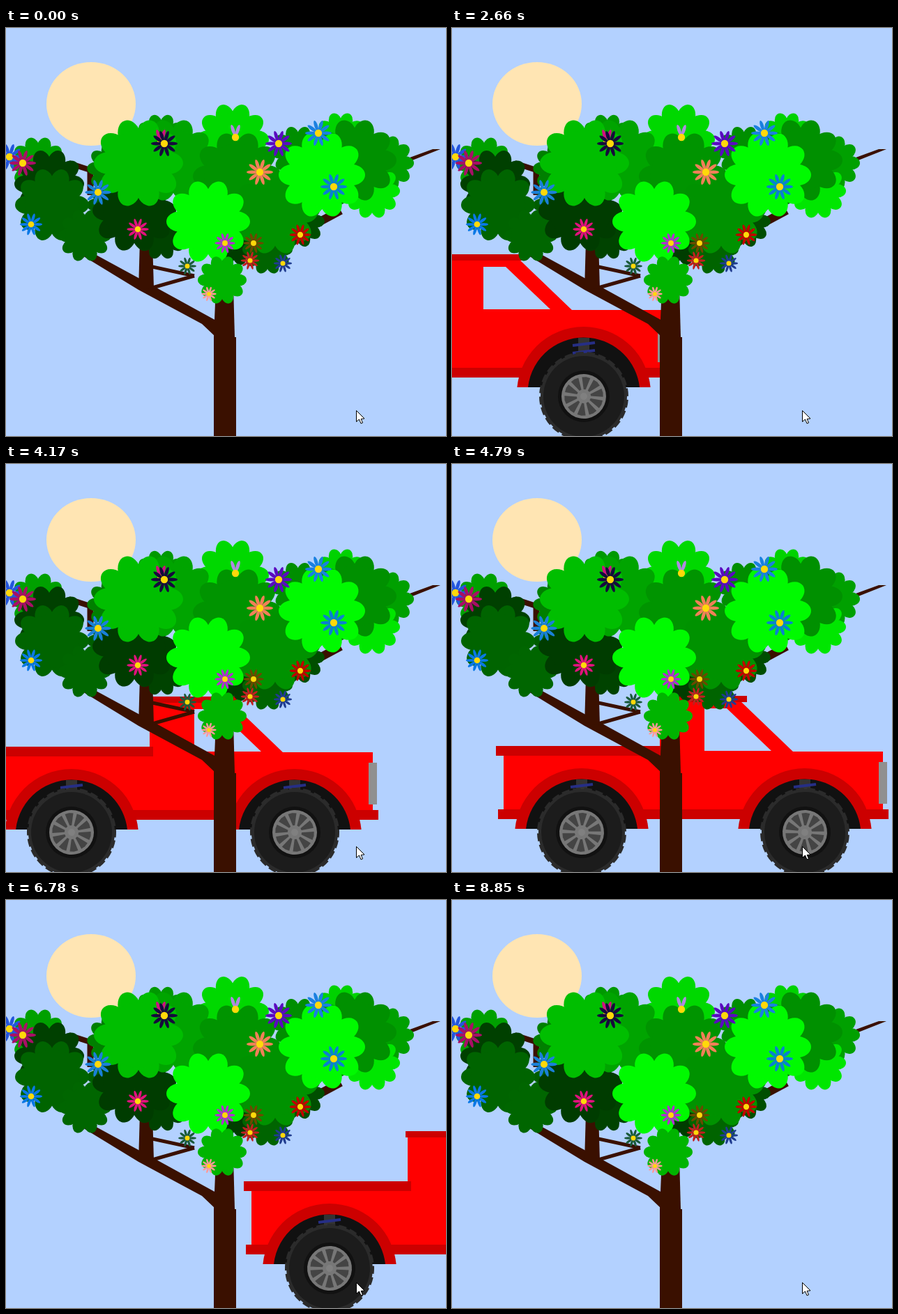
Animation, 631 px wide and 586 px high, one loop 9.08 s. Source, as an HTML page with a canvas:

```html
<!DOCTYPE html>
<html lang="en">
<head>
<meta charset="utf-8">
<title>Truck behind a tree</title>
<style>
html, body { margin: 0; width: 100%; height: 100%; overflow: hidden; background: #b3d1ff; }
canvas { display: block; }
</style>
</head>
<body>
<canvas id="stage" width="631" height="586"></canvas>
<script>
const W = 631, H = 586, LOOP = 9080;
const TAU = Math.PI * 2;
const RED = '#ff0000', DARK_RED = '#cc0000', BARK = '#3a1000', YELLOW = '#ffd80a';
const stage = document.getElementById('stage').getContext('2d');

function disc(g, x, y, r, color) {
  g.fillStyle = color;
  g.beginPath();
  g.arc(x, y, r, 0, TAU);
  g.fill();
}

function box(g, x1, y1, x2, y2, color) {
  g.fillStyle = color;
  g.fillRect(x1, y1, x2 - x1, y2 - y1);
}

function trace(g, p) {
  g.moveTo(p[0], p[1]);
  for (let i = 2; i < p.length; i += 2) g.lineTo(p[i], p[i + 1]);
  g.closePath();
}

function poly(g, color, ...p) {
  g.fillStyle = color;
  g.beginPath();
  trace(g, p);
  g.fill();
}

function line(g, color, width, x1, y1, x2, y2) {
  g.strokeStyle = color;
  g.lineWidth = width;
  g.beginPath();
  g.moveTo(x1, y1);
  g.lineTo(x2, y2);
  g.stroke();
}

// ring of ten ellipses reaching from the inner to the outer radius
function petals(g, x, y, inner, outer, halfWidth, color, first = 0, count = 10) {
  const mid = (inner + outer) / 2;
  g.fillStyle = color;
  for (let i = first; i < first + count; i++) {
    const a = i * TAU / 10;
    g.beginPath();
    g.ellipse(x + Math.cos(a) * mid, y + Math.sin(a) * mid, (outer - inner) / 2, halfWidth, a, 0, TAU);
    g.fill();
  }
}

function clump(g, x, y, r, level) {
  const color = `rgb(0,${Math.round(level)},0)`;
  petals(g, x, y, r * 0.32, r, r * 0.25, color);
  disc(g, x, y, r * 0.74, color);
}

// blossoms shrink towards the low branches
const blossomSize = y => 19 - Math.max(0, y - 230) * 0.055;

function blossom(g, x, y, color, first, count) {
  const r = blossomSize(y);
  petals(g, x, y, r * 0.16, r, r * 0.13, color, first, count);
  disc(g, x, y, r * 0.27, YELLOW);
}

function drawBranches(g) {
  box(g, 298, 444, 330, H, BARK);
  poly(g, BARK, 301, 370, 326, 370, 328, 444, 298, 444);
  poly(g, BARK, 100, 310, 212, 371, 301, 420, 301, 444, 281, 425, 190, 376, 100, 321);
  poly(g, BARK, 192, 305, 210, 305, 212, 374, 190, 376);
  line(g, BARK, 5, 210, 343, 270, 356);
  line(g, BARK, 5, 210, 373, 270, 356);
  line(g, BARK, 9, 121, 199, 121, 240);
  line(g, BARK, 8, 90, 194, 130, 207);
  line(g, BARK, 12, 400, 305, 480, 262);
  poly(g, BARK, 560, 193, 612, 174, 623, 174, 560, 199);
}

function drawFoliage(g) {
  // the back of the crown: dark below, lighter on top
  for (let i = 0; i < 9; i++) {
    const a = i * TAU / 9;
    clump(g, 300 + 155 * Math.cos(a), 228 + 77 * Math.sin(a), 38, 110 - 50 * Math.sin(a));
  }
  // x, y, radius, green level
  const front = [
    [46, 196, 40, 160], [62, 224, 50, 64], [66, 254, 53, 100], [113, 298, 38, 102],
    [325, 160, 52, 216], [480, 158, 37, 210], [545, 194, 40, 160], [525, 234, 40, 230],
    [500, 190, 60, 144], [375, 318, 36, 100], [184, 262, 60, 60], [240, 190, 60, 164],
    [332, 213, 64, 148], [386, 265, 61, 146], [190, 194, 64, 190], [453, 211, 62, 250],
    [290, 278, 60, 250], [310, 362, 35, 180]
  ];
  front.forEach(c => clump(g, ...c));
}

function drawBlossoms(g) {
  // half hidden: only the two top petals show
  blossom(g, 329, 157, '#b08ae0', 7, 2);
  blossom(g, 222, 164, '#d01080', 7, 2);

  const open = [
    [5, 185, '#2255dd'], [24, 194, '#a80f66'], [36, 282, '#0a78e6'], [132, 236, '#1a80d8'],
    [227, 166, '#160a3c'], [189, 289, '#e0127c'], [391, 166, '#5a0ac0'], [364, 207, '#f08058'],
    [448, 151, '#1a80e0'], [470, 228, '#0a80d0'], [314, 309, '#b030d0'], [355, 309, '#6a4a00'],
    [350, 334, '#c02020'], [422, 297, '#c00000'], [397, 338, '#203c90'], [260, 342, '#1a5a3a'],
    [291, 382, '#ff9a9a']
  ];
  open.forEach(b => blossom(g, ...b));
}

function makeTree() {
  const layer = document.createElement('canvas');
  layer.width = W;
  layer.height = H;
  const g = layer.getContext('2d');
  drawBranches(g);
  drawFoliage(g);
  drawBlossoms(g);
  return layer;
}

function drawSky(g) {
  box(g, 0, 0, W, H, '#b3d1ff');
  g.fillStyle = '#ffe5b3';
  g.beginPath();
  g.ellipse(122, 109, 64, 60, 0, 0, TAU);
  g.fill();
}

function arch(g, x, r, color) {
  const drop = Math.asin(9 / r);
  g.fillStyle = color;
  g.beginPath();
  g.arc(x, 523, r, Math.PI + drop, TAU - drop);
  g.fill();
}

function drawWheel(g, x, turn) {
  g.save();
  g.translate(x, 529);
  g.rotate(turn);
  disc(g, 0, 0, 62, '#2b2b2b');
  g.strokeStyle = '#2b2b2b';
  g.lineWidth = 4;
  g.setLineDash([62 * TAU / 24 - 5, 5]);
  g.beginPath();
  g.arc(0, 0, 62, 0, TAU);
  g.stroke();
  g.setLineDash([]);
  disc(g, 0, 0, 58, '#1c1c1c');
  disc(g, 0, 0, 37, '#111111');
  disc(g, 0, 0, 32, '#777777');
  for (let i = 0; i < 10; i++) {
    g.rotate(TAU / 10);
    poly(g, '#444444', 10, -1.5, 27, -6, 28, 0, 27, 6, 10, 1.5);
  }
  disc(g, 0, 0, 5, '#808080');
  g.restore();
}

// x counts from the front axle; sink lowers the body on its springs
function drawTruck(g, x, sink) {
  const axles = [-320, 0];
  g.save();
  g.translate(x, sink);

  g.fillStyle = RED;
  g.beginPath();
  trace(g, [-208, 330, -93, 330, -16, 404, -208, 404]);
  trace(g, [-144, 341, -112, 341, -48, 402, -144, 402]);
  g.fill('evenodd');

  box(g, -432, 403, 112, 487, RED);
  box(g, -211, 323, -83, 332, DARK_RED);
  box(g, -443, 395, -203, 409, DARK_RED);
  box(g, -440, 486, 120, 500, DARK_RED);
  box(g, 106, 418, 118, 478, '#909090');
  for (const a of axles) {
    arch(g, a, 96, DARK_RED);
    arch(g, a, 80.5, '#111111');
    box(g, a - 8, 443, a + 8, 480, '#333333');
    for (const y of [452, 463]) line(g, '#262e85', 4, a - 16, y + 2, a + 16, y - 2);
  }
  g.restore();
  for (const a of axles) drawWheel(g, x + a, x / 64);
}

function drawCursor(g) {
  g.save();
  g.translate(502.5, 549.5);
  g.beginPath();
  trace(g, [0, 0, 0, 16, 4, 12.5, 6.5, 18.5, 9, 17.5, 6.7, 12, 11.5, 11.5]);
  g.fillStyle = '#ffffff';
  g.fill();
  g.strokeStyle = '#000000';
  g.lineWidth = 1;
  g.stroke();
  g.restore();
}

const START = 370, STEP = 45.1, STEPS = 188, STRIDE = 4.8;

// time and front axle position: the speed varies slightly on the way
const route = [[START, -118], [2180, 122], [4970, 533], [7810, 928], [8850, 1076]];

function axleAt(t) {
  const i = Math.max(1, route.findIndex(([time]) => time >= t));
  const [t0, x0] = route[i - 1], [t1, x1] = route[i];
  const x = x0 + (x1 - x0) * (t - t0) / (t1 - t0);
  return Math.round(Math.round((x + 8) / STRIDE) * STRIDE - 8);
}

const sinkAt = t => Math.round(6 + 6 * Math.cos((t - 1580) / 2840 * TAU));

const tree = makeTree();

function render(t) {
  drawSky(stage);
  const step = Math.floor((t - START + 8) / STEP);
  if (step >= 0 && step < STEPS) {
    const held = START + step * STEP;
    drawTruck(stage, axleAt(held), sinkAt(held));
  }
  stage.drawImage(tree, 0, 0);
  drawCursor(stage);
}

const start = performance.now();
function tick() {
  render((performance.now() - start) % LOOP);
  requestAnimationFrame(tick);
}
tick();
</script>
</body>
</html>
```
